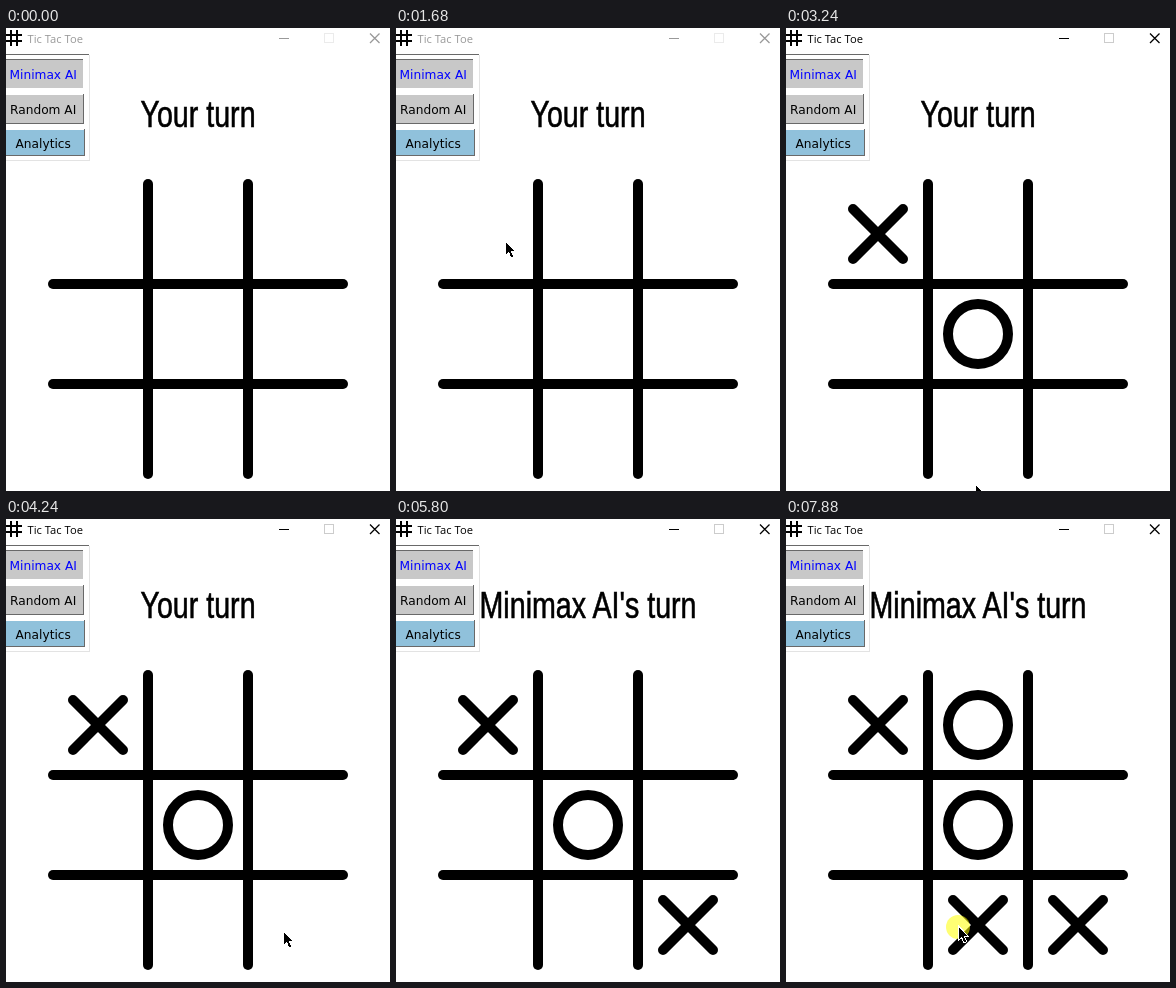
These frames come from a looping animation (384 px wide and 463 px high, 8 s). An HTML page:

```html
<!DOCTYPE html>
<html lang="en">
<head>
<meta charset="utf-8">
<title>Tic Tac Toe</title>
<style>
  html, body { margin: 0; width: 100%; height: 100%; overflow: hidden; background: #fff; }
  svg { display: block; width: 384px; height: 463px; }
  .title { font: 11.2px "Open Sans", sans-serif; }
  .button { font: 12.2px "DejaVu Sans", sans-serif; }
  .status { font: 36px "Liberation Sans", Arial, sans-serif; text-anchor: middle; stroke: #000; stroke-width: .6; }
  .mark { fill: none; stroke: #000; stroke-width: 10; stroke-linecap: round; }
  .crisp { shape-rendering: crispEdges; }
</style>
</head>
<body>
<svg viewBox="0 0 384 463">
  <path class="crisp" d="M0 7H16M0 13H16M5 2V18M11 2V18" stroke="#000" stroke-width="2"/>
  <text class="title" id="title" x="21.5" y="15">Tic Tac Toe</text>
  <g id="controls" fill="none">
    <path class="crisp" d="M273 10.5H283"/>
    <path d="M364 5.5L373.5 15M373.5 5.5L364 15" stroke-width="1.3"/>
  </g>
  <rect id="maximize" x="318.5" y="5.5" width="9" height="9" fill="none"/>

  <g class="crisp" fill="none">
    <path d="M0 26.5H83" stroke="#696969"/>
    <path d="M83.5 27V132.5H0" stroke="#e3e3e3"/>
  </g>
  <g id="buttons"></g>

  <text class="status" id="status" transform="translate(192 98.6) scale(.795 1)"></text>

  <g id="board"></g>
  <circle id="glow" r="12" fill="#ff0" fill-opacity=".55"/>
  <path id="cursor" class="crisp" d="M1 0V12.2L3.8 9.7L6 15.2L8 14.4L5.8 9H9.3Z"
        fill="#000" stroke="#fff" stroke-width="2" paint-order="stroke"/>
</svg>
<script>
const LOOP = 8000, STEP = 80, REPLY = 1040, GLOW = 200;
const $ = id => document.getElementById(id);

function add(parent, tag, attrs, text) {
  const el = document.createElementNS("http://www.w3.org/2000/svg", tag);
  for (const name in attrs) el.setAttribute(name, attrs[name]);
  if (text) el.textContent = text;
  return parent.appendChild(el);
}

function button(label, x, y, w, h, fill, pressed) {
  const g = $("buttons"), dark = "#696969", light = "#fff";
  const edge = (d, stroke) => add(g, "path", { d, stroke, fill: "none", class: "crisp" });
  add(g, "rect", { y, width: w, height: h, fill, class: "crisp" });
  edge(`M0 ${y + .5}H${w}`, pressed ? dark : light);
  edge(`M0 ${y + h - .5}H${w - .5}V${y}`, pressed ? light : dark);
  add(g, "text", { x, y: y + h / 2 + 5, fill: pressed ? "#00f" : "#000", class: "button" }, label);
}
button("Minimax AI", 3.5, 31, 78, 30, "#c8c8c8", true);
button("Random AI", 4, 66, 78, 30, "#c8c8c8");
button("Analytics", 9.5, 101, 79, 27, "#90c1db");

for (const i of [0, 1]) {
  add($("board"), "rect", { x: 137 + 100 * i, y: 151, width: 10, height: 300, rx: 5 });
  add($("board"), "rect", { x: 42, y: 251 + 100 * i, width: 300, height: 10, rx: 5 });
}

function mark(who, at, [col, row]) {
  const x = 92 + 100 * col, y = 206 + 100 * row;
  const el = who === "X"
    ? add($("board"), "path", { class: "mark", d: `M${x - 25} ${y - 25}l50 50m0 -50l-50 50` })
    : add($("board"), "circle", { class: "mark", cx: x, cy: y, r: 30 });
  return { at, el };
}

// Each click places an X; the AI answers after a fixed delay.
const turns = [
  { at: 2160, cell: [0, 0], answer: [1, 1] },
  { at: 5160, cell: [2, 2], answer: [1, 0] },
  { at: 7880, cell: [1, 2] }
];
const marks = turns.flatMap(({ at, cell, answer }) =>
  [mark("X", at, cell), ...(answer ? [mark("O", at + REPLY, answer)] : [])]);

// Times the pointer is over the window, where it enters, and its glides: [start, end, x, y]
const visits = [
  { from: 200, to: 3480, enter: [253, 417], glides: [
    [200, 440, 198, 303], [520, 760, 195, 302], [1200, 1680, 109, 214],
    [2520, 2680, 173, 435], [2680, 3320, 191, 457]] },
  { from: 3800, to: 5800, enter: [227, 433], glides: [
    [3800, 4240, 277, 413], [5640, 5720, 280, 446]] },
  { from: 6960, to: LOOP, enter: [144, 450], glides: [[6960, 7600, 172, 408]] }
];

// Glides advance in steps; the vertical part runs ahead of the horizontal.
function pointer(t) {
  const visit = visits.find(v => t >= v.from && t < v.to);
  if (!visit) return null;
  let [x, y] = visit.enter;
  for (const [start, end, toX, toY] of visit.glides) {
    if (t < start) break;
    const held = end - STEP * Math.ceil(Math.max(0, end - t) / STEP);
    const p = Math.max(0, (held - start) / (end - start));
    x += (toX - x) * p;
    y += (toY - y) * (1 - (1 - p) ** 2);
  }
  return [Math.round(x), Math.round(y)];
}

const show = (el, on) => el.setAttribute("visibility", on ? "visible" : "hidden");

function draw(t) {
  for (const m of marks) show(m.el, t >= m.at);
  const waiting = turns.some(({ at }) => t >= at && t < at + REPLY);
  $("status").textContent = waiting ? "Minimax AI's turn" : "Your turn";

  const active = t >= turns[0].at;
  $("title").setAttribute("fill", active ? "#000" : "#999");
  $("controls").setAttribute("stroke", active ? "#000" : "#999");
  $("maximize").setAttribute("stroke", active ? "#ccc" : "#ebebeb");

  const pos = pointer(t);
  show($("cursor"), pos);
  show($("glow"), pos && turns.some(({ at }) => t >= at && t < at + GLOW));
  if (pos) {
    for (const id of ["cursor", "glow"]) $(id).setAttribute("transform", `translate(${pos})`);
  }
}

const start = performance.now();
function tick() {
  draw((performance.now() - start) % LOOP);
  requestAnimationFrame(tick);
}
tick();
</script>
</body>
</html>
```
